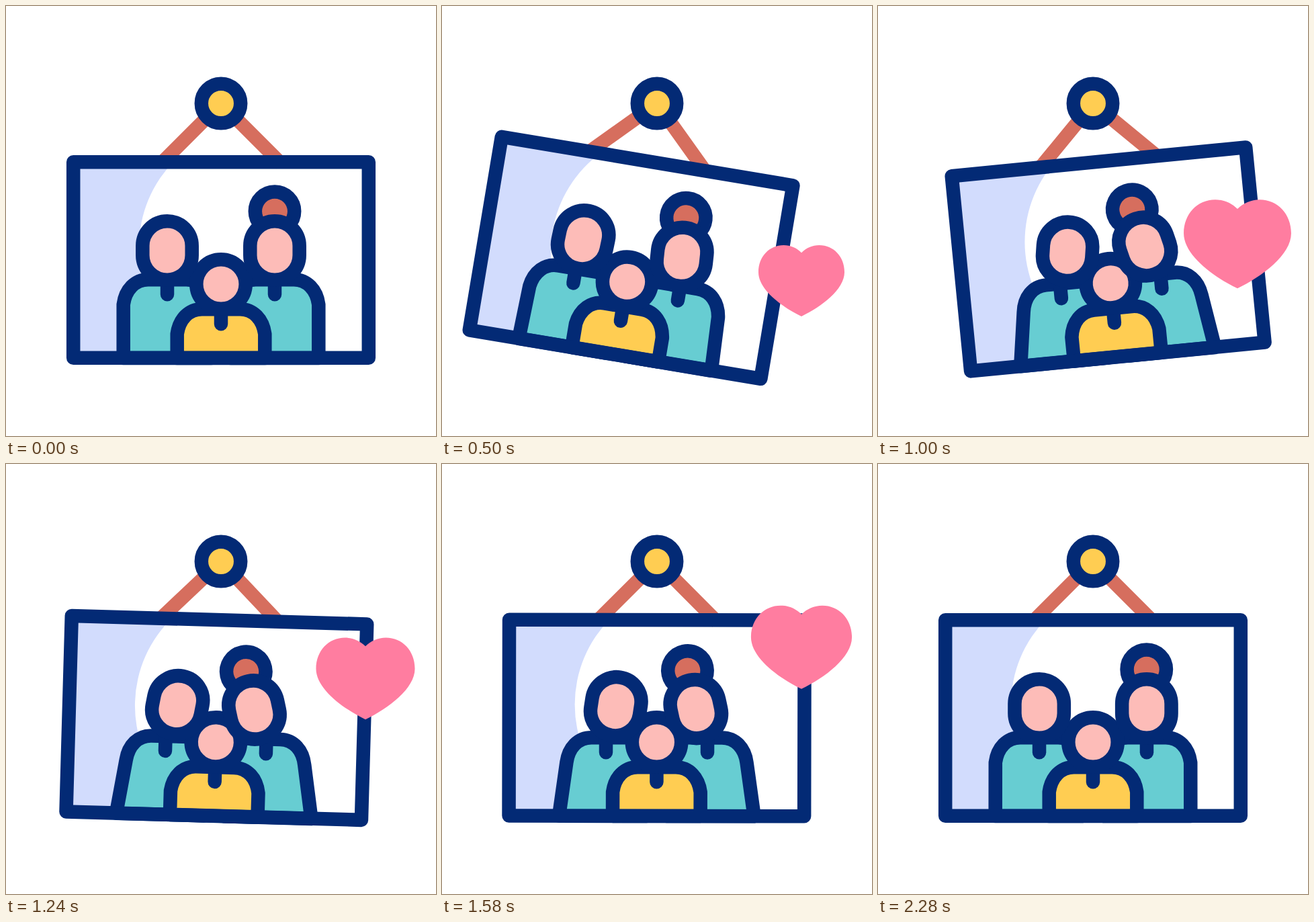
These frames come from a looping animation (640 px wide and 640 px high, 2.4 s). An HTML page:

```html
<!DOCTYPE html>
<html lang="en">
<head>
<meta charset="utf-8">
<title>Family picture</title>
<style>
  html, body { margin: 0; width: 100%; height: 100%; overflow: hidden; background: #fff; }
  svg { display: block; width: 100%; height: 100%; }
  .line { stroke: #032a75; stroke-width: 20.5; stroke-linecap: round; stroke-linejoin: round; }
  .skin { fill: #fdbcb8; }
  .teal { fill: #67cdd2; }
  .gold { fill: #ffcd52; }
  .red { fill: #d66e5e; }
</style>
</head>
<body>
<svg viewBox="0 0 640 640">
  <g id="picture">
    <path fill="#d2dcfd" d="M100 232H250V524H100z"/>
    <circle cx="379" cy="358" r="181" fill="#fff"/>
    <path d="M230 235L320 145L410 235" fill="none" stroke="#d66e5e" stroke-width="20.5"/>
    <path id="manBody" class="line teal"/>
    <path id="manCollar" class="line"/>
    <path id="womanBody" class="line teal"/>
    <path id="womanCollar" class="line"/>
    <path id="childBody" class="line gold"/>
    <path id="childCollar" class="line"/>
    <circle class="line skin" cx="320" cy="414" r="36.7"/>
    <g id="manHead">
      <rect class="line skin" x="-36.7" y="-43.7" width="73.4" height="87.4" rx="36.7"/>
    </g>
    <g id="womanHead">
      <circle class="line red" cy="-58.4" r="29.2"/>
      <rect class="line skin" x="-36.7" y="-43.7" width="73.4" height="87.4" rx="36.7"/>
    </g>
    <rect class="line" fill="none" x="100.2" y="232.2" width="439.6" height="291.6"/>
  </g>
  <circle class="line gold" cx="320" cy="145" r="29.2"/>
  <path id="heart" fill="#ff7da0" d="M0-49C-8-57-19-62-31-62C-56-62-75-42-75-15C-75 15-35 45 0 62C35 45 75 15 75-15C75-42 56-62 31-62C19-62 8-57 0-49z"/>
</svg>
<script>
const LOOP = 2400;
const SWING = [[0, 0], [620, 10.5], [955, -6], [1290, 2.1], [1625, 0]];
const PULSE = [[275, 0], [592, 160], [792, 115], [992, 160], [1192, 143],
               [1392, 170], [1592, 150], [1792, 170], [2110, 0]];

const part = id => document.getElementById(id);
const smooth = u => u * u * (3 - 2 * u);

// Symmetric cubic-bezier(.75, 0, .25, 1)
function steep(x) {
  let low = 0, high = 1;
  for (let i = 0; i < 24; i++) {
    const s = (low + high) / 2, r = 1 - s;
    if (2.25 * s * r * r + 0.75 * s * s * r + s * s * s < x) low = s;
    else high = s;
  }
  return smooth(low);
}

function tween(keys, t) {
  if (t <= keys[0][0]) return keys[0][1];
  for (let i = 1; i < keys.length; i++) {
    const [t0, a] = keys[i - 1], [t1, b] = keys[i];
    if (t < t1) return a + (b - a) * smooth((t - t0) / (t1 - t0));
  }
  return keys[keys.length - 1][1];
}

function drawBody(name, x, top, lean) {
  const left = x - 65.3, right = x + 65.3, shift = 12.5 * lean, neck = x + 5 * lean;
  const shoulder = top + 37;
  part(name + 'Body').setAttribute('d',
    `M${left} 524L${left + shift} ${shoulder}` +
    `Q${left + shift + 5} ${top} ${left + shift + 37} ${top}`.replace(/^Q.*/,
      `c3-22 17-37 37-37`) +
    `H${right + shift - 37}c20 0 34 15 37 37L${right} 524z`);
  part(name + 'Collar').setAttribute('d', `M${neck} ${top}V${top + 22}`);
}

function drawHead(name, x, y, angle) {
  part(name + 'Head').setAttribute('transform', `translate(${x} ${y}) rotate(${angle})`);
}

function render(t) {
  const lean = steep(1 - Math.abs(t / 1200 - 1));
  part('picture').setAttribute('transform', `rotate(${tween(SWING, t)} 320 145)`);
  drawBody('man', 240, 407.3, lean);
  drawBody('woman', 400, 407.3, -lean);
  drawHead('man', 240 + 21.3 * lean, 364 - 3.5 * lean, 9.5 * lean);
  drawHead('woman', 400 - 24.3 * lean, 364 + 0.5 * lean, -13.7 * lean);

  const rise = smooth(Math.min(1, Math.max(0, (t - 275) / 1835)));
  part('heart').setAttribute('transform',
    `translate(535 ${416.5 - 180 * rise}) scale(${tween(PULSE, t) / 150})`);
}

function tick() {
  render(performance.now() % LOOP);
  requestAnimationFrame(tick);
}

drawBody('child', 320, 451.2, 0);
tick();
</script>
</body>
</html>
```
